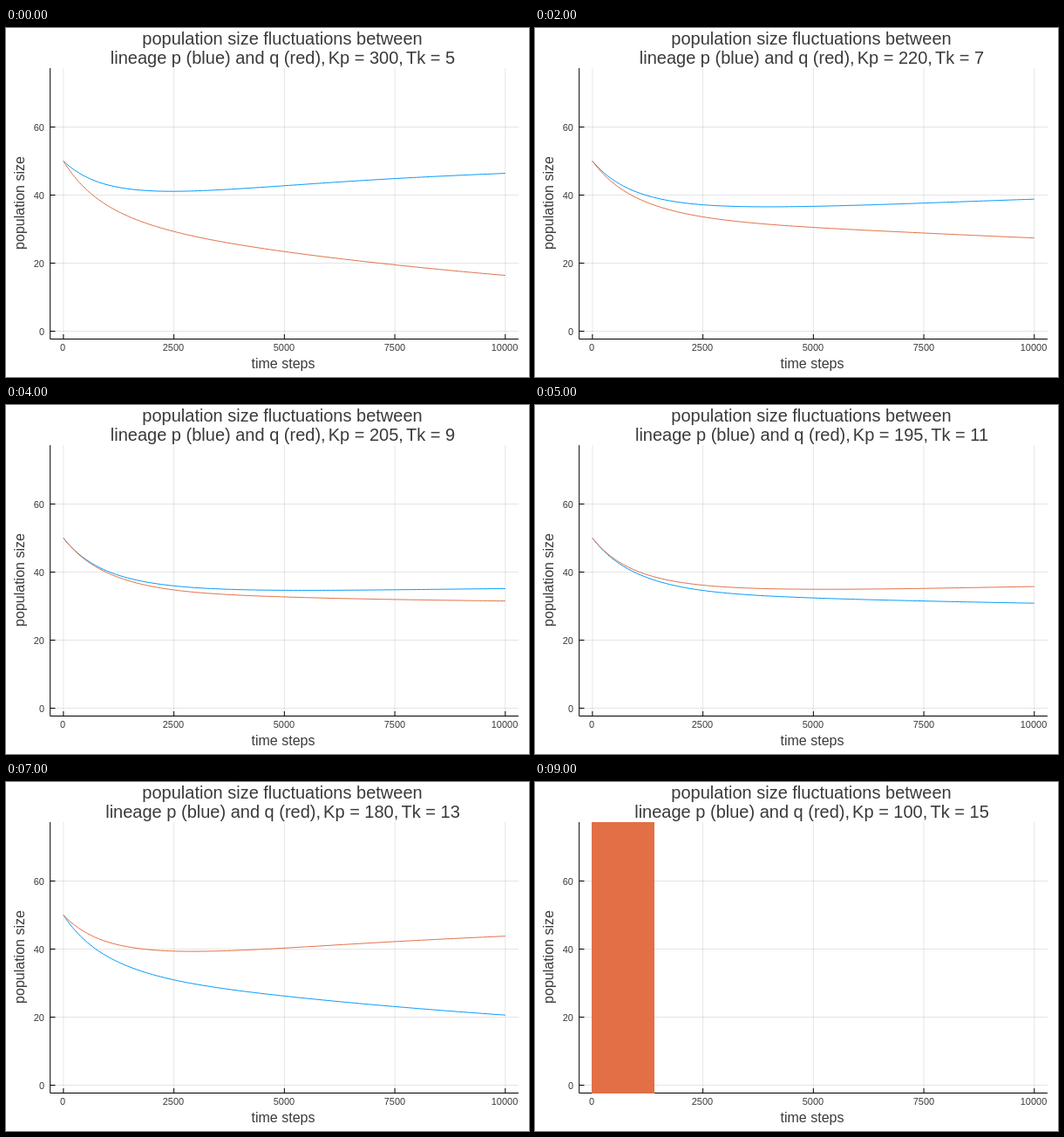
Recreate the animation shown at these times as an HTML page. Size 600 by 400 pixels, loop 10000 ms.

```html
<!DOCTYPE html>
<html lang="en">
<head>
<meta charset="utf-8">
<title>Population size fluctuations</title>
<style>
  html, body { margin: 0; width: 100%; height: 100%; overflow: hidden; background: #fff; }
  svg { display: block; width: 600px; height: 400px; }
  text { font-family: "Liberation Sans", Arial, sans-serif; fill: #3a3a3a; text-anchor: middle; }
  .title { font-size: 20px; }
  .label { font-size: 16px; }
  .tick { font-size: 11px; }
  .tick.y { text-anchor: end; }
  path { fill: none; }
  #grid { stroke: #000; stroke-opacity: .1; }
  #axes { stroke: #000; }
  #blue { stroke: #009afa; }
  #red { stroke: #e26f46; }
  #burst { fill: #e26f46; }
</style>
</head>
<body>
<svg viewBox="0 0 600 400">
  <path id="grid"/>
  <path id="axes"/>
  <g id="ticks"></g>
  <text class="title" x="317" y="19">population size fluctuations between</text>
  <text class="title" x="317.5" y="41">lineage p (blue) and q (red), <tspan id="kp" dx="-2.5"></tspan> <tspan id="tk" dx="-2"></tspan></text>
  <text class="label" x="318" y="390">time steps</text>
  <text class="label" transform="translate(21 200.5) rotate(-90)">population size</text>
  <path id="blue"/>
  <path id="red"/>
  <rect id="burst" x="65" y="46" width="72" height="311"/>
</svg>
<script>
const $ = id => document.getElementById(id);
const STEP = 1000;
const START = 50;
const TIMES = [0, 1000, 2500, 5000, 7500, 10000];

// Sizes of both lineages at TIMES, after the shared start; the last run diverges.
const RUNS = [
  { kp: 300, tk: 5,  p: [43, 41.1, 42.75, 44.85, 46.4],     q: [36.9, 29.3, 23.4, 19.5, 16.4] },
  { kp: 250, tk: 6,  p: [41.8, 38.95, 39.8, 41.45, 43],     q: [38.1, 31.6, 26.9, 24, 21.6] },
  { kp: 220, tk: 7,  p: [40.9, 37.15, 36.7, 37.65, 38.8],   q: [39.2, 33.6, 30.5, 28.85, 27.4] },
  { kp: 210, tk: 8,  p: [40.5, 36.4, 35.4, 35.85, 36.5],    q: [39.5, 34.4, 31.9, 30.8, 30] },
  { kp: 205, tk: 9,  p: [40.25, 35.95, 34.65, 34.8, 35.15], q: [39.75, 34.75, 32.7, 31.95, 31.5] },
  { kp: 195, tk: 11, p: [39.65, 34.6, 32.4, 31.5, 30.85],   q: [40.35, 36.15, 34.95, 35.2, 35.75] },
  { kp: 190, tk: 12, p: [39.2, 33.7, 30.75, 29.15, 27.8],   q: [40.8, 37, 36.5, 37.4, 38.4] },
  { kp: 180, tk: 13, p: [37.8, 30.95, 26.2, 23.1, 20.6],    q: [42.1, 39.4, 40.3, 42.2, 43.8] },
  { kp: 150, tk: 14, p: [32, 21.15, 13.6, 9.95, 7.75],      q: [47.75, 47.95, 49, 49.5, 49.72] },
  { kp: 100, tk: 15 }
];

const plotX = t => 65.9 + t * 0.05069;
const plotY = v => 347.5 - v * 3.9;
const warp = t => Math.log(1 + t / 800);

// Natural cubic spline through the points (xs, ys)
function spline(xs, ys) {
  const n = xs.length - 1;
  const h = i => xs[i + 1] - xs[i];
  const slope = i => (ys[i + 1] - ys[i]) / h(i);
  const c = [0], d = [0], bend = Array(n + 1).fill(0);
  for (let i = 1; i < n; i++) {
    const m = 2 * (h(i - 1) + h(i)) - h(i - 1) * c[i - 1];
    c[i] = h(i) / m;
    d[i] = (6 * (slope(i) - slope(i - 1)) - h(i - 1) * d[i - 1]) / m;
  }
  for (let i = n - 1; i > 0; i--) bend[i] = d[i] - c[i] * bend[i + 1];
  return x => {
    let i = 0;
    while (i < n - 1 && x > xs[i + 1]) i++;
    const w = h(i), b = (x - xs[i]) / w, a = 1 - b;
    return a * ys[i] + b * ys[i + 1] +
      ((a ** 3 - a) * bend[i] + (b ** 3 - b) * bend[i + 1]) * w * w / 6;
  };
}

function curve(sizes) {
  if (!sizes) return "";
  const size = spline(TIMES.map(warp), [START, ...sizes]);
  const points = [];
  for (let t = 0; t <= 10000; t += 50) {
    points.push(plotX(t).toFixed(2) + " " + plotY(size(warp(t))).toFixed(2));
  }
  return "M" + points.join("L");
}

function addTick(kind, x, y, value) {
  const text = document.createElementNS("http://www.w3.org/2000/svg", "text");
  text.setAttribute("class", "tick " + kind);
  text.setAttribute("x", x);
  text.setAttribute("y", y);
  text.textContent = value;
  $("ticks").append(text);
}

function drawFrame() {
  let grid = "", axes = "M50.7 46V356.5H588";
  for (let t = 0; t <= 10000; t += 2500) {
    const x = plotX(t);
    grid += `M${x} 46V356`;
    axes += `M${x} 356.5V351`;
    addTick("x", Math.floor(x), 370, t);
  }
  for (let v = 0; v <= 60; v += 20) {
    const y = plotY(v);
    grid += `M51 ${y}H588`;
    axes += `M50.7 ${y}H56.5`;
    addTick("y", 44, y + 4, v);
  }
  $("grid").setAttribute("d", grid);
  $("axes").setAttribute("d", axes);
}

let shown = -1;
function show(index) {
  if (index === shown) return;
  shown = index;
  const { kp, tk, p, q } = RUNS[index];
  $("kp").textContent = `Kp = ${kp},`;
  $("tk").textContent = `Tk = ${tk}`;
  $("blue").setAttribute("d", curve(p));
  $("red").setAttribute("d", curve(q));
  $("burst").style.display = p ? "none" : "";
}

const begin = performance.now();
function tick() {
  show(Math.floor((performance.now() - begin) / STEP) % RUNS.length);
  requestAnimationFrame(tick);
}

drawFrame();
tick();
</script>
</body>
</html>
```
